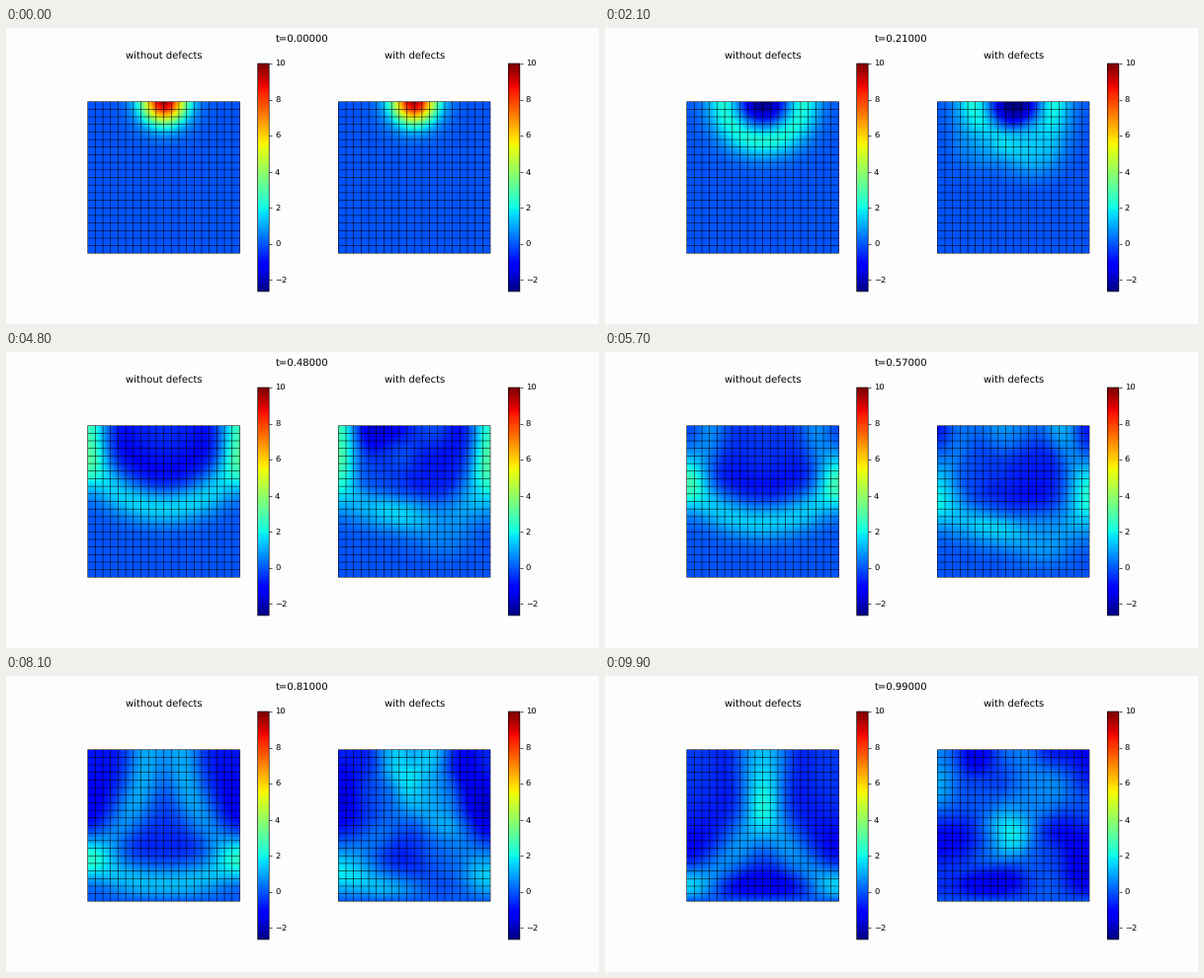
Animation of 600 by 300 pixels, one loop 10 s. Source, as a matplotlib script:

```python
import numpy as np
import matplotlib.pyplot as plt
from matplotlib.animation import FuncAnimation
from matplotlib.patches import Rectangle

plt.rcParams.update({"text.hinting": "none", "path.snap": False})

FRAMES = 100
CELLS = 20
N = CELLS + 1
H = 1 / CELLS
DT = 0.005
SUBSTEPS = 2        # solver steps per frame

# Stiff defects: centre x, centre y, radius, wave speed inside
DEFECTS = [
    (0.64, 0.70, 0.12, 2.1),
    (0.25, 0.69, 0.10, 2.1),
    (0.70, 0.28, 0.10, 2.0),
]

# Bilinear square element, corners in circular order
STIFF = np.array([[4, -1, -2, -1], [-1, 4, -1, -2],
                  [-2, -1, 4, -1], [-1, -2, -1, 4]]) / 6
MASS = np.array([[4, 2, 1, 2], [2, 4, 2, 1],
                 [1, 2, 4, 2], [2, 1, 2, 4]]) * H ** 2 / 36


def wave_speed(x, y, defects):
    speed = np.ones_like(x)
    for cx, cy, radius, inside in defects:
        dist = np.hypot(x - cx, y - cy)
        speed += (inside - 1) * 0.5 * (1 - np.tanh((dist - radius) / 0.02))
    return speed


def assemble(defects):
    """Acceleration matrix for the nodes above the fixed bottom row."""
    row, col = np.divmod(np.arange(CELLS ** 2), CELLS)
    first = row * N + col
    nodes = first[:, None] + np.array([0, 1, N + 1, N])
    speed = wave_speed((col + 0.5) * H, (row + 0.5) * H, defects)
    k = np.zeros((N * N, N * N))
    m = np.zeros_like(k)
    index = nodes[:, :, None], nodes[:, None, :]
    np.add.at(k, index, speed[:, None, None] ** 2 * STIFF)
    np.add.at(m, index, MASS)
    return -np.linalg.solve(m[N:, N:], k[N:, N:])


def refine(u):
    """Bilinear values on a mesh twice as fine."""
    fine = np.empty((2 * N - 1, 2 * N - 1))
    fine[::2, ::2] = u
    fine[1::2, ::2] = (u[:-1] + u[1:]) / 2
    fine[:, 1::2] = (fine[:, :-1:2] + fine[:, 2::2]) / 2
    return fine


def simulate(defects):
    """Wave equation: free top and sides, fixed bottom."""
    accel = assemble(defects)
    axis = np.linspace(0, 1, N)
    x, y = np.meshgrid(axis, axis)
    full = 10 * np.exp(-50 * ((x - 0.5) ** 2 + (y - 1) ** 2))
    full[0] = 0
    u = full[1:].ravel()
    prev = u + 0.5 * DT ** 2 * (accel @ u)
    states = [refine(full)]
    for _ in range(FRAMES - 1):
        for _ in range(SUBSTEPS):
            u, prev = 2 * u - prev + DT ** 2 * (accel @ u), u
        full[1:] = u.reshape(N - 1, N)
        states.append(refine(full))
    return states


def make_panel(ax, title, field):
    half = H / 4
    image = ax.imshow(
        field, origin="lower", cmap="jet", vmin=-2.65, vmax=10,
        extent=(-half, 1 + half, -half, 1 + half), aspect="auto",
        interpolation="bilinear", interpolation_stage="rgba",
    )
    fig.colorbar(image, ax=ax)
    image.set_clip_path(Rectangle((0, 0), 1, 1, transform=ax.transData))

    lines = np.linspace(0, 1, N)
    ax.hlines(lines, 0, 1, colors="black", linewidth=0.65)
    ax.vlines(lines, 0, 1, colors="black", linewidth=0.65)

    # Equal scale while keeping the full axes box
    box = ax.get_position()
    ratio = box.height * 300 / (box.width * 600)
    ax.set_xlim(-0.05, 1.05)
    ax.set_ylim(0.5 - 0.55 * ratio, 0.5 + 0.55 * ratio)
    ax.axis("off")
    ax.set_title(title)
    return image


runs = [simulate([]), simulate(DEFECTS)]

fig, axes = plt.subplots(1, 2, figsize=(10, 5), dpi=60, facecolor="#fdfdfd")
names = ["without defects", "with defects"]
images = [make_panel(ax, name, run[0]) for ax, name, run in zip(axes, names, runs)]
clock = fig.suptitle("t=0.00000")


def update(i):
    for image, run in zip(images, runs):
        image.set_data(run[i])
    clock.set_text(f"t={i / 100:.5f}")
    return [*images, clock]


anim = FuncAnimation(fig, update, frames=FRAMES, interval=100, repeat=True)
plt.show()
```
